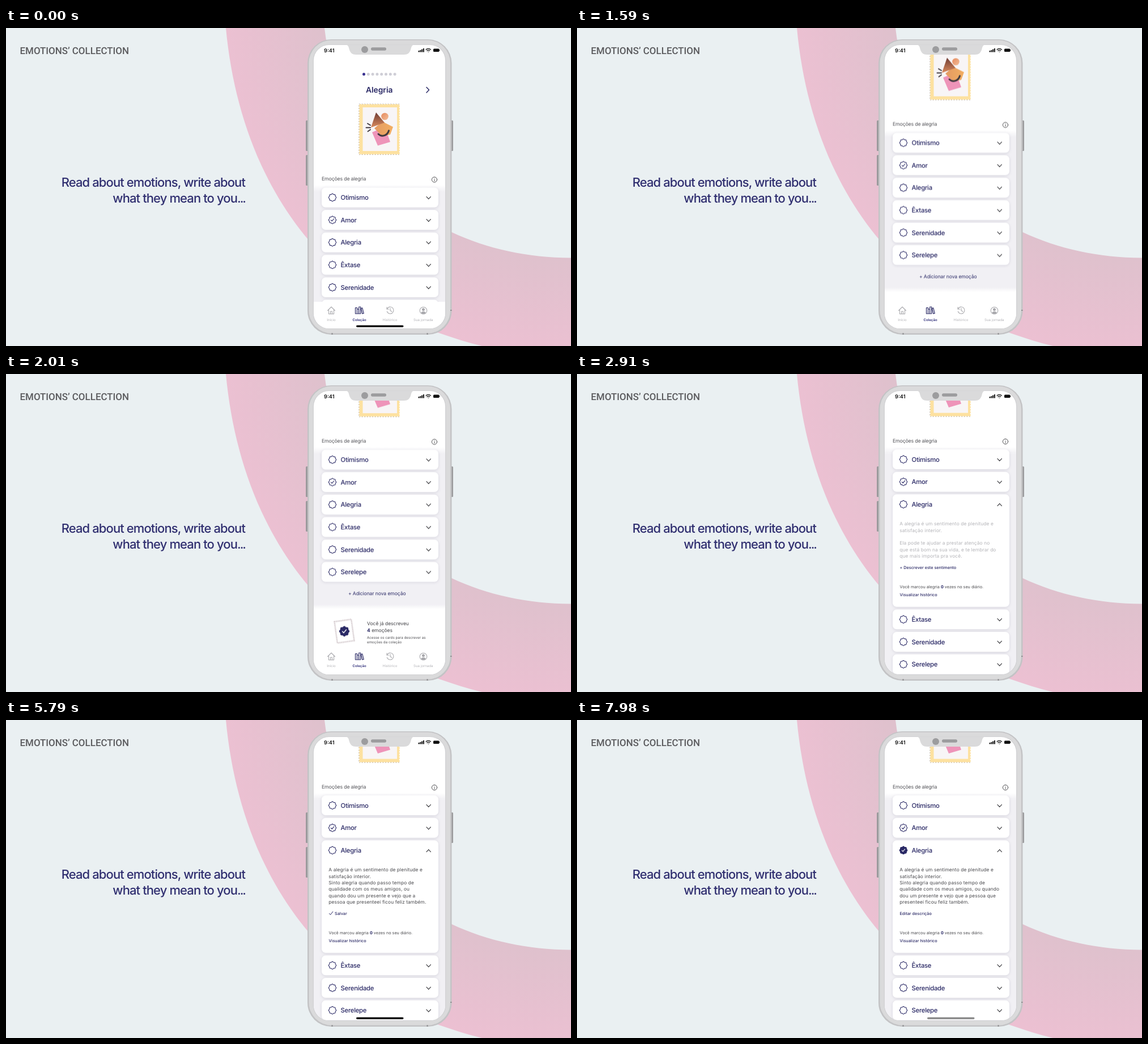
Write an HTML page that moves like this. It is 997 by 561 pixels and loops after 8000 ms.

```html
<!DOCTYPE html>
<html lang="en">
<head>
<meta charset="utf-8">
<title>Emotions’ collection</title>
<style>
html,body{margin:0;width:100%;height:100%;overflow:hidden;background:#eaf0f2}
svg{display:block;width:100%;height:100%}
text{font-family:Inter,Roboto,sans-serif;fill:#2b2a66;text-rendering:geometricPrecision}
.line{fill:none;stroke:#2b2a66;stroke-linecap:round;stroke-linejoin:round}
.dark{stroke:#3a3a3e}
.item{font-size:11.3px;font-weight:500;letter-spacing:-.27px}
.note{font-size:8.8px;letter-spacing:-.2px;fill:#55555a}
.body{font-size:8.4px;letter-spacing:.1px;fill:#4a4a4e}
.hint .body{fill:#b4b4b8}
.small{font-size:7.25px}
.link{font-weight:500}
.tab{font-size:6.1px;text-anchor:middle;fill:#b2b2b6}
.tabIcon{stroke:#a9a9ad}
.headline{font-size:22px;font-weight:500;letter-spacing:-.9px;text-anchor:end;fill:#302f70}
.card{fill:#fff;filter:drop-shadow(0 1px 2.5px rgba(60,50,90,.14))}

#scroll,#below,#open,#closed,#tabs,#bar,.hint,.typed,.draft,.saved{animation:8s linear infinite both}
#scroll{animation-name:scroll}
#below{animation:push 8s step-end infinite both}
#open{animation:show 8s step-end infinite both}
#closed,#tabs{animation:hide 8s step-end infinite both}
#bar{animation-name:bar}
.hint{animation-name:hint}
.typed{animation-name:typed}
.draft{animation-name:draft}
.saved{animation-name:saved}
@keyframes scroll{
  0%,16.81%{transform:translateY(0);animation-timing-function:cubic-bezier(.26,.1,.14,1)}
  26%,100%{transform:translateY(-148.4px)}
}
@keyframes push{0%{transform:translateY(0)}36.375%,100%{transform:translateY(163.4px)}}
@keyframes show{0%{visibility:hidden}36.375%,100%{visibility:visible}}
@keyframes hide{0%{visibility:visible}36.375%,100%{visibility:hidden}}
@keyframes bar{0%,10.3%{opacity:1}16.8%,41%{opacity:0}46.9%,92.2%{opacity:1}100%{opacity:.46}}
@keyframes hint{0%,63.5%{opacity:1}69.8%,100%{opacity:0}}
@keyframes typed{0%,63.5%{opacity:0}69.8%,100%{opacity:1}}
@keyframes draft{0%,63.5%{opacity:0}69.8%,84.9%{opacity:1}92%,100%{opacity:0}}
@keyframes saved{0%,84.9%{opacity:0}92%,100%{opacity:1}}
</style>
</head>
<body>
<svg viewBox="0 0 997 561" preserveAspectRatio="none">
  <defs>
    <radialGradient id="pink" gradientUnits="userSpaceOnUse" cx="1000" cy="-40" r="622">
      <stop offset=".72" stop-color="#dfc1cd"/><stop offset="1" stop-color="#ecc0d2"/>
    </radialGradient>
    <linearGradient id="listTop" x2="0" y2="1">
      <stop stop-color="#fff"/><stop offset="1" stop-color="#f1f0f4"/>
    </linearGradient>
    <linearGradient id="listEnd" x2="0" y2="1">
      <stop stop-color="#f1f0f4"/><stop offset="1" stop-color="#fff"/>
    </linearGradient>
    <linearGradient id="brown" x2="0" y2="1">
      <stop stop-color="#6f3b34"/><stop offset="1" stop-color="#d98a5c"/>
    </linearGradient>
    <linearGradient id="peach" x2="1" y2="1">
      <stop stop-color="#e58a5e"/><stop offset="1" stop-color="#f3bd98"/>
    </linearGradient>
    <linearGradient id="amber" x2="1" y2="0">
      <stop stop-color="#e39a62"/><stop offset="1" stop-color="#f2ae62"/>
    </linearGradient>
    <clipPath id="glass"><rect x="543" y="30" width="232" height="500" rx="27"/></clipPath>
  </defs>

  <path fill="url(#pink)" d="M388 0C401 140 448 272 533 373C596 447 672 505 764 538C790 547 815 555 840 561H997V405.500C920 405 850 390 786 360C650 295 580 150 562 0Z"/>
  <text x="24.500" y="46" style="font:500 16.950px Roboto,sans-serif;fill:#5b5b5e">EMOTIONS’ COLLECTION</text>
  <text class="headline" x="422" y="280">Read about emotions, write about</text>
  <text class="headline" x="422" y="308">what they mean to you<tspan letter-spacing="-2">...</tspan></text>

  <g fill="#9b9b9d">
    <rect x="529" y="163" width="5" height="54" rx="1.500"/>
    <rect x="529" y="224" width="5" height="54" rx="1.500"/>
    <rect x="784" y="163" width="5" height="54" rx="1.500"/>
  </g>
  <rect x="532" y="20" width="254.500" height="521" rx="42" fill="#c3c3c5"/>
  <rect x="534.500" y="21.500" width="249.500" height="517" rx="40" fill="#dadadb"/>
  <path stroke="#8f8f92" stroke-width="2" d="M575.500 538v3M743.500 538v3M784 498h2.500"/>
  <rect x="541.500" y="29" width="235" height="502" rx="28" fill="#d3d3d5"/>

  <g clip-path="url(#glass)">
    <rect x="543" y="30" width="232" height="500" fill="#fff"/>
    <g id="scroll">
      <g id="dots"></g>
      <text x="658.700" y="114" text-anchor="middle" style="font-size:13.800px;font-weight:600">Alegria</text>
      <path class="line" stroke-width="1.500" d="M742 104.500l4.500 4.700-4.500 4.700"/>

      <rect x="622.800" y="134" width="72" height="89.500" fill="#fde1a0"/>
      <rect x="622.800" y="134" width="72" height="89.500" fill="none" stroke="#fff" stroke-width="2.300" stroke-linecap="round" stroke-dasharray="0 4.600"/>
      <path fill="none" stroke="#b9b3b0" stroke-width=".8" stroke-dasharray="2.300 2.300" d="M694 134H622.700V223.500H694"/>
      <rect x="629.500" y="140" width="60.500" height="77" fill="#f8f5f6"/>
      <path fill="#ee94b9" d="M646 184L662 177L672 184L678 201L656 207.500Z"/>
      <path fill="url(#amber)" d="M650 177L664 165L683 174.500L678 188L664 191Z"/>
      <path fill="url(#brown)" d="M653 149L668 167L644 175.500Z"/>
      <circle cx="668.500" cy="156" r="6.300" fill="url(#peach)"/>
      <path class="line" style="stroke:#403a40" stroke-width="3" d="M657 187C663 193 673 190 675.500 181"/>
      <path class="line" style="stroke:#403a40" stroke-width="2" d="M638 168.500l5 3M635.500 175.800h7.500M638.500 182.500l4.500-3.200"/>

      <text class="note" x="557" y="269">Emoções de alegria</text>
      <g class="line dark" stroke-width=".9"><circle cx="756" cy="267.500" r="4.600"/><path d="M756 267.200v2.500M756 265.200v.1"/></g>
      <rect x="543" y="277" width="232" height="12" fill="url(#listTop)"/>
      <rect x="543" y="289" width="232" height="500" fill="#f1f0f4"/>
      <g id="above"></g>

      <g id="below">
        <text x="654.700" y="538" text-anchor="middle" style="font-size:8.600px;letter-spacing:-.1px">+ Adicionar nova emoção</text>
        <rect x="543" y="554" width="232" height="8" fill="url(#listEnd)"/>
        <rect x="543" y="562" width="232" height="300" fill="#fff"/>
        <g transform="rotate(-8 597 601.500)">
          <rect x="582" y="582.500" width="30" height="38" fill="#fff" stroke="#d9d0d3" stroke-width="2.600" stroke-dasharray="2 .800"/>
        </g>
        <g id="reward"></g>
        <text x="637" y="591" style="font-size:8.500px;fill:#3f3f44">Você já descreveu</text>
        <text x="637" y="602.500" style="font-size:8.500px;fill:#3f3f44"><tspan font-weight="700" fill="#2b2a66">4</tspan> emoções</text>
        <text x="637" y="614.700" style="font-size:6.240px;fill:#4a4a4e">Acesse os cards para descrever as</text>
        <text x="637" y="623.200" style="font-size:6.240px;fill:#4a4a4e">emoções da coleção</text>
      </g>
      <g id="closed"></g>
      <g id="open"></g>
    </g>

    <g id="tabs">
      <rect x="543" y="483" width="232" height="47" fill="#fff"/>
      <g class="line tabIcon" stroke-width="1.100">
        <path d="M567.500 498.500L574 492L580.500 498.500M569.500 497.500V504.500H578.500V497.500M572.500 504V500H575.500V504"/>
        <path d="M672.500 495.500A6 6 0 1 1 672.300 500M672 492.500V496H675.500M678 494.500V498.500L681 500.300"/>
        <circle cx="736.500" cy="498.500" r="6.300"/>
        <path fill="#a9a9ad" d="M736.500 494.800a2 2 0 1 1-.1 0M732.800 502.500C734 500 739 500 740.200 502.500C738 504 735 504 732.800 502.500"/>
      </g>
      <path class="line" stroke-width="1.200" d="M616.500 493.500h3v10.500h-3zM619.500 496h3v8h-3zM622.700 492h3v12h-3zM626.500 494.500l2.300-.6 2.400 9.400-2.500.7z"/>
      <text class="tab" x="574" y="516.500">Início</text>
      <text class="tab" x="623.500" y="516.500" style="fill:#2b2a76;font-weight:600">Coleção</text>
      <text class="tab" x="677.500" y="516.500">Histórico</text>
      <text class="tab" x="736.200" y="516.500">Sua jornada</text>
    </g>
    <rect id="bar" x="618" y="524.500" width="83.500" height="3.200" rx="1.600"/>
  </g>

  <path fill="#dadadb" d="M599 29.500C604 30 604.500 33 605.500 37C607.500 44 611 47 618 47H702C709 47 712.500 44 714.500 37C715.500 33 716 30 721 29.500Z"/>
  <circle cx="633" cy="38" r="6" fill="#9c9c9e"/>
  <rect x="644" y="34.300" width="27" height="5.400" rx="2.700" fill="#9c9c9e"/>
  <text x="561" y="42.500" style="font-size:9.200px;font-weight:600;fill:#111">9:41</text>
  <path fill="#111" d="M727.500 40h2v2.500h-2zM730.300 39h2v3.500h-2zM733.100 37.500h2v5h-2zM735.900 36h2v6.500h-2z"/>
  <path class="line" style="stroke:#111" stroke-width="1.400" d="M741.200 38C743.500 35.900 747 35.900 749.300 38M743 40C744.300 39 746.200 39 747.500 40M745.200 42v.1"/>
  <rect x="754" y="36.500" width="10.500" height="5.500" rx="1.500" fill="#111"/>
  <rect x="764.500" y="38.200" width="1" height="2" fill="#111"/>
</svg>
<script>
const FIRST = 299, PITCH = 39.62, OPEN_Y = FIRST + 2 * PITCH;
const add = (id, markup) => document.getElementById(id).insertAdjacentHTML('beforeend', markup);

function badge(x, y, r, {checked = false, filled = false} = {}) {
  const points = Array.from({length: 96}, (_, i) => {
    const a = i * Math.PI / 48, d = r * (1 + .08 * Math.cos(8 * a));
    return (x + d * Math.cos(a)).toFixed(2) + ',' + (y + d * Math.sin(a)).toFixed(2);
  }).join(' ');
  const k = r / 6.2;
  const check = `<path class="line" style="${filled ? 'stroke:#fff' : ''}" stroke-width="${1.1 * k}"
    d="M${x - 2.6 * k} ${y + .2 * k}l${1.8 * k} ${1.9 * k} ${3.4 * k} ${-4.2 * k}"/>`;
  return `<polygon class="line" stroke-width="1.1" points="${points}" style="${filled ? 'fill:#2b2a66' : ''}"/>`
    + (checked ? check : '');
}

function item(name, y, {checked = false, open = false} = {}) {
  const dy = open ? -4 : 4;
  return `<rect class="card" x="557" y="${y - 17.5}" width="206" height="${open ? 198.5 : 35}" rx="7"/>
    ${badge(576, y, 6.2, {checked})}
    <text class="item" x="590.5" y="${y + 4.1}">${name}</text>
    <path class="line dark" stroke-width="1.2" d="M742 ${y + .7 - dy / 2}l3.700 ${dy} 3.700 ${-dy}"/>`;
}

const BODY_Y = OPEN_Y + 37.3, LEAD = 11.4;
const lines = (from, ...texts) => texts.map((t, i) =>
  `<text class="body" x="569.3" y="${BODY_Y + (from + i) * LEAD}">${t}</text>`).join('');
const small = (dy, text, link = 'link', x = 569.5) =>
  `<text class="small ${link}" x="${x}" y="${OPEN_Y + dy}">${text}</text>`;

add('dots', Array.from({length: 8}, (_, i) =>
  `<circle cx="${631.5 + i * 7.8}" cy="81.5" r="2.5" fill="${i ? '#cfced6' : '#3a3190'}"/>`).join(''));
add('above', item('Otimismo', FIRST) + item('Amor', FIRST + PITCH, {checked: true}));
add('closed', item('Alegria', OPEN_Y));
add('below', ['Êxtase', 'Serenidade', 'Serelepe'].map((n, i) => item(n, OPEN_Y + (i + 1) * PITCH)).join(''));
add('reward', badge(597, 601.7, 8, {checked: true, filled: true}));

add('open', item('Alegria', OPEN_Y, {open: true}) + `
  <g class="hint">
    ${lines(0, 'A alegria é um sentimento de plenitude e', 'satisfação interior.')}
    ${lines(3, 'Ela pode te ajudar a prestar atenção no', 'que está bom na sua vida, e te lembrar do', 'que mais importa pra você.')}
    ${small(113.8, '+ Descrever este sentimento')}
  </g>
  <g class="typed">
    ${lines(0, 'A alegria é um sentimento de plenitude e', 'satisfação interior.', 'Sinto alegria quando passo tempo de')}
  </g>
  <g class="draft">
    ${lines(3, 'qualidade com os meus amigos, ou', 'quando dou um presente e vejo que a', 'pessoa que presenteei ficou feliz também.')}
    <path class="line" stroke-width="1" d="M570.500 ${OPEN_Y + 111.5}l2 2.300 4.300-5.600"/>
    ${small(113.8, 'Salvar', 'link', 580)}
  </g>
  <g class="saved">
    ${badge(576, OPEN_Y, 6.2, {checked: true, filled: true})}
    ${lines(3, 'qualidade com os meus amigos, ou quando', 'dou um presente e vejo que a pessoa que', 'presenteei ficou feliz também.')}
    ${small(113.8, 'Editar descrição')}
  </g>
  ${small(148.6, '<tspan fill="#4a4a4e">Você marcou alegria </tspan><tspan font-weight="700">0</tspan><tspan fill="#4a4a4e"> vezes no seu diário.</tspan>', '')}
  ${small(162.4, 'Visualizar histórico')}`);
</script>
</body>
</html>
```
